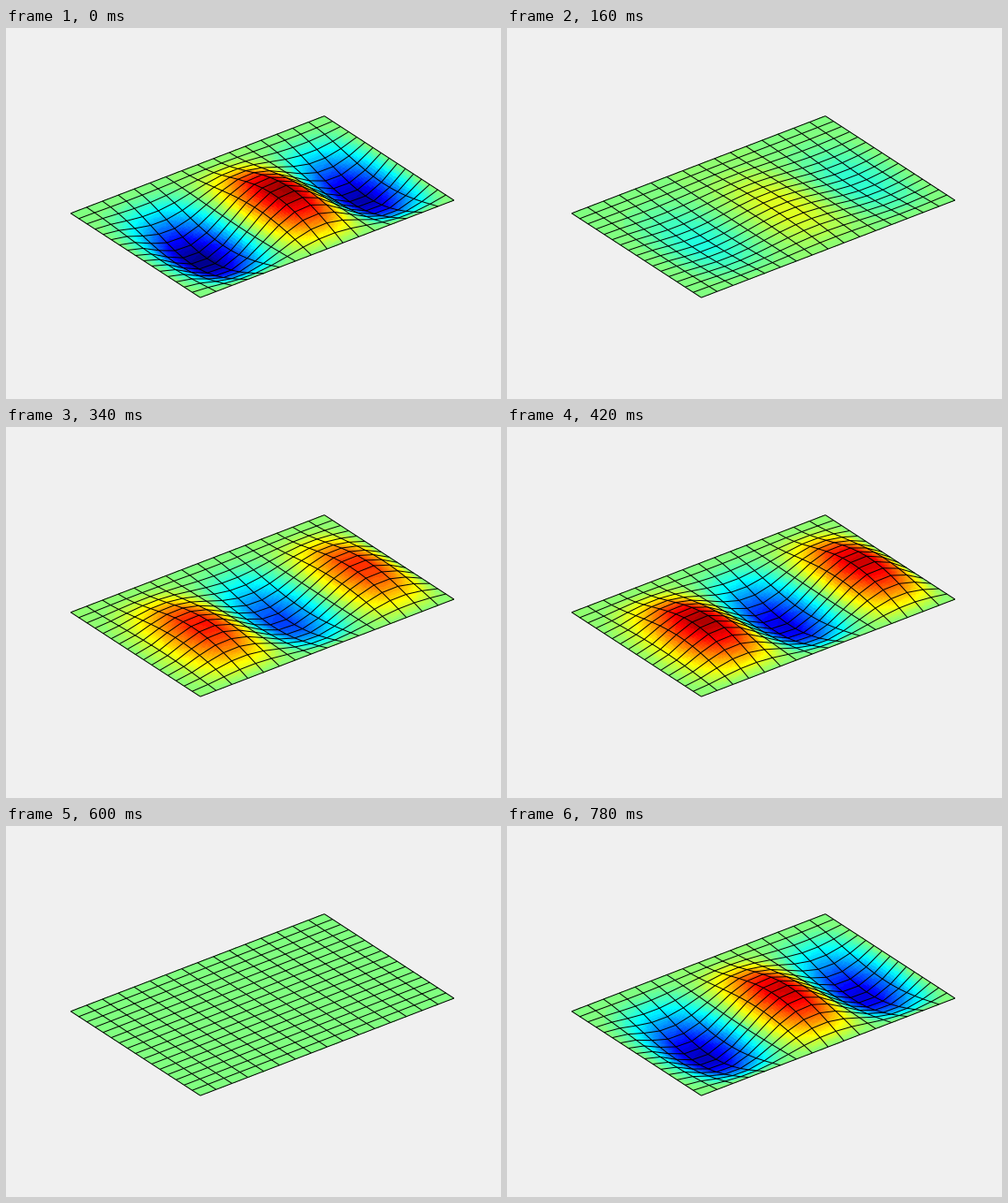
Recreate the animation shown at these times as a matplotlib script. Size 560 by 420 pixels, loop 800 ms.

```python
import numpy as np
import matplotlib.pyplot as plt
from matplotlib.animation import FuncAnimation
from matplotlib.collections import LineCollection

W, H, DPI = 560, 420, 100
FRAMES, INTERVAL = 40, 20
CELLS = 16
SHADES = 8   # colour steps along each side of a cell
HEIGHT = 25  # peak displacement in pixels

CENTRE = np.array([290.0, 202.4])
LONG = np.array([287.0, -110.2])
SHORT = np.array([146.6, 95.4])


def beam(x, beta):
    """Mode shape of a beam clamped at 0 and hinged at 1."""
    ratio = (np.cosh(beta) - np.cos(beta)) / (np.sinh(beta) - np.sin(beta))
    k = beta * x
    return np.cosh(k) - np.cos(k) - ratio * (np.sinh(k) - np.sin(k))


def jet(value):
    """64-step jet colours for values from -1 to 1."""
    i = np.clip(np.ceil(32 + 32 * value - 1e-6), 1, 64)
    r = np.minimum(i - 24, 72 - i)
    g = np.minimum(i - 8, 56 - i)
    b = np.minimum(i + 8, 40 - i)
    return np.clip(np.stack([r, g, b], axis=-1) / 16, 0, 1)


def hat_weights(x):
    """Matrix that interpolates grid values linearly at the points x."""
    return np.clip(1 - np.abs(x[:, None] - grid) * CELLS, 0, 1)


def project(u, v, z):
    """Screen points of the plate at (u, v) with height z."""
    points = CENTRE + (u[:, None, None] - 0.5) * LONG + (v[None, :, None] - 0.5) * SHORT
    points[..., 1] -= HEIGHT * z
    return points


grid = np.linspace(0, 1, CELLS + 1)
mode = -np.outer(beam(grid, 10.210176), beam(grid, 3.926602))
mode[[0, -1], :] = 0
mode[:, [0, -1]] = 0
mode /= np.abs(mode).max()

fine = np.linspace(0, 1, CELLS * SHADES + 1)
at_corners = hat_weights(fine)
at_middles = hat_weights((fine[1:] + fine[:-1]) / 2)
corner_mode = at_corners @ mode @ at_corners.T
middle_mode = at_middles @ mode @ at_middles.T


def amplitude(frame):
    """Triangle wave: 1 at the start, -1 halfway through the loop."""
    return abs(frame % FRAMES - FRAMES / 2) / (FRAMES / 4) - 1


def update(frame):
    a = amplitude(frame)
    for old in list(ax.collections):
        old.remove()
    skin = project(fine, fine, a * corner_mode)
    ax.pcolormesh(skin[..., 0], skin[..., 1], jet(a * middle_mode),
                  antialiased=False, zorder=1)
    knots = project(grid, grid, a * mode)
    wires = [*knots, *knots.swapaxes(0, 1)]
    ax.add_collection(LineCollection(wires, colors="black", linewidths=72 / DPI,
                                     zorder=2), autolim=False)
    ax.set_xlim(0, W)
    ax.set_ylim(H, 0)
    return ax.collections


fig = plt.figure(figsize=(W / DPI, H / DPI), dpi=DPI, facecolor="#f0f0f0")
ax = fig.add_axes([0, 0, 1, 1])
ax.axis("off")
update(0)

anim = FuncAnimation(fig, update, frames=FRAMES, interval=INTERVAL,
                     repeat=True, repeat_delay=0, blit=False)
plt.show()
```
